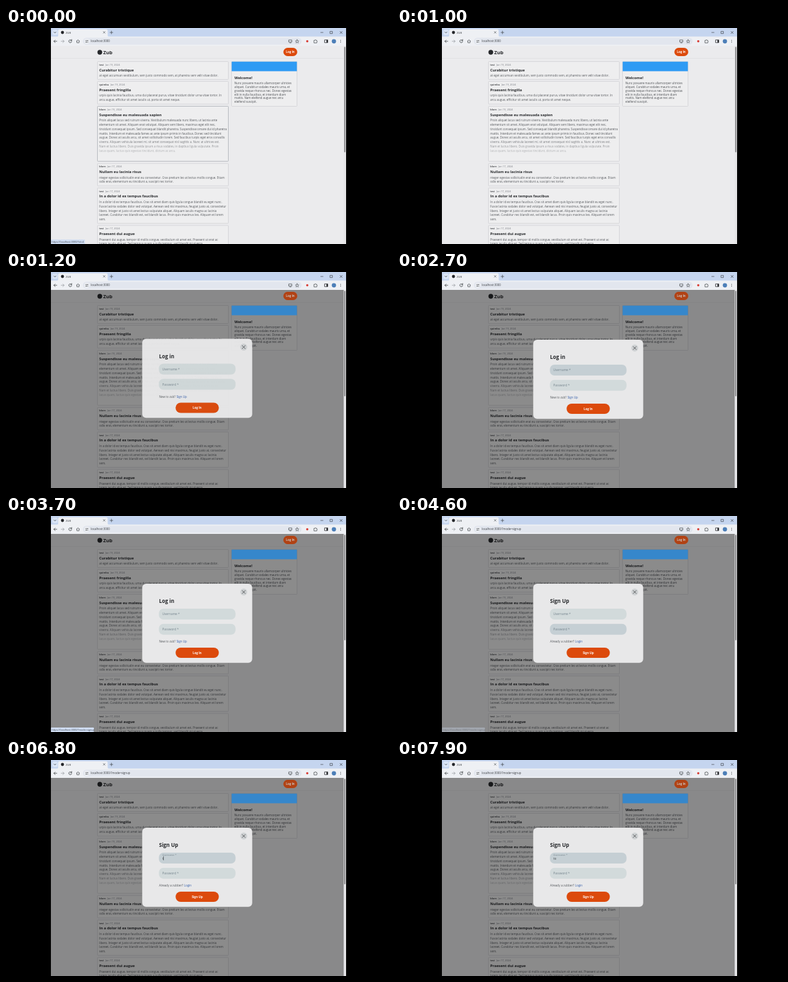
An HTML page for the animation above (8 s loop, 600 by 338 pixels).

```html
<!DOCTYPE html>
<html lang="en">
<head>
<meta charset="utf-8">
<title>Log in dialog</title>
<style>
html, body { margin: 0; width: 100%; height: 100%; overflow: hidden; background: #000; }
svg { display: block; width: 100vw; height: 100vh; font-family: "Open Sans", "Noto Sans", sans-serif; }
</style>
</head>
<body>
<svg id="stage" viewBox="0 0 600 338"></svg>
<script>
const stage = document.getElementById('stage');
const LOOP = 8000, STEP = 100;
const INK = '#26282b', ORANGE = '#dc4a0c', PAGE = '#ebebed', CARD = '#eeeeef', LINE = '#cdcdd1';
const BAR = '#eef0f4';

function add(parent, tag, attrs = {}, content) {
  const el = document.createElementNS('http://www.w3.org/2000/svg', tag);
  set(el, attrs);
  if (content !== undefined) el.textContent = content;
  parent.appendChild(el);
  return el;
}
function set(el, attrs) {
  for (const key in attrs) el.setAttribute(key, attrs[key]);
}
const group = (p, attrs) => add(p, 'g', attrs);
const rect = (p, x, y, width, height, fill, more) =>
  add(p, 'rect', { x, y, width, height, fill, ...more });
const dot = (p, cx, cy, r, fill, more) => add(p, 'circle', { cx, cy, r, fill, ...more });
const line = (p, d, stroke = '#3c4043', width = 0.8) =>
  add(p, 'path', { d, stroke, 'stroke-width': width, fill: 'none', 'stroke-linecap': 'round', 'stroke-linejoin': 'round' });
const label = (p, x, y, size, fill, str, more) =>
  add(p, 'text', { x, y, 'font-size': size, fill, ...more }, str);
const bold = { 'font-weight': 700 };
const centred = { 'font-weight': 700, 'text-anchor': 'middle' };

// Piecewise linear value from [time, value] pairs
function track(t, keys) {
  if (t <= keys[0][0]) return keys[0][1];
  for (let i = 1; i < keys.length; i++) {
    const [t0, v0] = keys[i - 1], [t1, v1] = keys[i];
    if (t <= t1) return v0 + (v1 - v0) * (t - t0) / (t1 - t0);
  }
  return keys[keys.length - 1][1];
}
const within = (t, a, b) => t >= a && t < b;
const show = (el, on) => el.setAttribute('opacity', +on);

const fade = add(add(stage, 'defs'), 'linearGradient', { id: 'fade', x1: 0, y1: 0, x2: 0, y2: 1 });
add(fade, 'stop', { offset: 0, 'stop-color': CARD, 'stop-opacity': 0 });
add(fade, 'stop', { offset: 1, 'stop-color': CARD });

rect(stage, 0, 0, 600, 338, '#000');

// Page
const page = group(stage);
rect(page, 70, 28, 460, 310, PAGE);
rect(page, 70, 47, 456, 0.6, '#dcdce0');
dot(page, 146.2, 38, 3.7, INK);
label(page, 151.5, 41, 7.6, INK, 'Zub', bold);

const posts = [
  [52.5, 28, 'tovi', '19', 'Curabitur tristique', [
    'at eget accumsan vestibulum, sem justo commodo sem, at pharetra sem velit vitae dolor.']],
  [83.5, 35.5, 'quimbu', '19', 'Praesent fringilla', [
    'urpis quis lacinia faucibus, urna dui placerat purus, vitae tincidunt dolor urna vitae tortor. In',
    'arcu augue, efficitur sit amet iaculis ut, porta sit amet neque.']],
  [122.5, 86, 'blorn', '19', 'Suspendisse eu malesuada sapien', [
    'Proin aliquet lacus sed rutrum viverra. Vestibulum malesuada nunc libero, ut lacinia ante',
    'elementum sit amet. Aliquam erat volutpat. Aliquam sem libero, maximus eget elit nec,',
    'tincidunt consequat ipsum. Sed consequat blandit pharetra. Suspendisse ornare dui id pharetra',
    'mattis. Interdum et malesuada fames ac ante ipsum primis in faucibus. Donec sed tincidunt',
    'augue. Donec at iaculis arcu, sit amet sollicitudin lorem. Sed faucibus turpis eget eros convallis',
    'viverra. Aliquam vehicula laoreet mi, sit amet consequat nisl sagittis a. Nunc at ultrices est.',
    'Nam et luctus libero. Duis gravida ipsum a risus sodales, in dapibus ligula vulputate. Proin',
    'lacus quam, luctus quis egestas tincidunt, dictum ac arcu.']],
  [212, 35, 'blorn', '17', 'Nullam eu lacinia risus', [
    'nteger egestas sollicitudin erat eu consectetur. Cras pretium leo at lectus mollis congue. Etiam',
    'odio erat, elementum eu tincidunt a, suscipit nec tortor.']],
  [250.3, 55.4, 'tovi', '17', 'In a dolor id ex tempus faucibus', [
    'In a dolor id ex tempus faucibus. Cras sit amet diam quis ligula congue blandit eu eget nunc.',
    'Fusce lacinia sodales dolor sed volutpat. Aenean sed nisi maximus, feugiat justo at, consectetur',
    'libero. Integer et justo sit amet lectus vulputate aliquet. Aliquam iaculis magna ac lacinia',
    'laoreet. Curabitur nec blandit est, vel blandit lacus. Proin quis maximus leo. Aliquam et lorem',
    'sem.']],
  [309, 60, 'tovi', '17', 'Praesent dui augue', [
    'Praesent dui augue, tempor id mollis congue, vestibulum sit amet est. Praesent ut erat ac',
    'lorem iaculis aliquet. Sed tempus quam a nulla tempor, sed blandit mi viverra.']]
];
const cards = posts.map(([y, h, user, day, title, rows]) => {
  const card = rect(page, 142.5, y, 204, h, CARD, { stroke: LINE, 'stroke-width': 0.7, rx: 0.8 });
  const name = label(page, 145.3, y + 6.3, 4, '#34363a', user, { 'font-weight': 600 });
  label(page, 145.3 + name.getComputedTextLength() + 2.4, y + 6.3, 4, '#777a80', `Jan ${day}, 2024`);
  label(page, 145.3, y + 15.1, 5.75, INK, title, bold);
  rows.forEach((row, i) => label(page, 145.3, y + 23.6 + i * 6.83, 4.48, '#55585c', row));
  return card;
});
rect(page, 143, 170, 203, 38, 'url(#fade)');

rect(page, 351.5, 52.5, 102, 70, CARD, { stroke: LINE, 'stroke-width': 0.7, rx: 0.8 });
label(page, 356, 79.8, 5.75, INK, 'Welcome!', bold);
['Nunc posuere mauris ullamcorper ultricies',
 'aliquet. Curabitur sodales mauris urna, et',
 'gravida neque rhoncus nec. Donec egestas',
 'elit in nulla faucibus, et interdum diam',
 'mattis. Nam eleifend augue nec arcu',
 'eleifend suscipit.'
].forEach((row, i) => label(page, 356, 88.1 + i * 5.83, 4.48, '#4c4f53', row));

const shade = rect(stage, 70, 28, 460, 310, '#000');

// The banner and the button keep more of their colour under the shade
const vivid = group(stage);
rect(vivid, 351.7, 52.7, 101.6, 14.9, '#2f9bf4');
rect(vivid, 432.3, 31, 21.6, 13, ORANGE, { rx: 6.5 });
label(vivid, 443.1, 39.1, 4.5, '#fff', 'Log In', centred);
const vividShade = group(stage);
rect(vividShade, 351.7, 52.7, 101.6, 14.9, '#4a5560');
rect(vividShade, 432.3, 31, 21.6, 13, '#40302a', { rx: 6.5 });

rect(stage, 526.3, 28, 3.7, 310, '#e6e6e8');
rect(stage, 526.9, 29.5, 2.2, 165, '#909092', { rx: 1 });

// Browser frame
const chrome = group(stage);
rect(chrome, 70, 0, 460, 14, '#c5d5ef');
add(chrome, 'path', { d: 'M79 14q2.3 0 2.3-2.3V4.5q0-2.5 2.5-2.5H156q2.5 0 2.5 2.5v7.2q0 2.3 2.3 2.3z', fill: BAR });
rect(chrome, 70, 13.4, 460, 14.6, BAR);
rect(chrome, 72, 2.5, 8.5, 8.5, '#d9e4f6', { rx: 2.5 });
line(chrome, 'M74.7 6.2l1.6 1.6l1.6-1.6');
dot(chrome, 88, 7, 2.4, INK);
label(chrome, 93.2, 8.5, 4, '#33363a', 'ZUB');
line(chrome, 'M151.6 5.4l2.8 2.8m0-2.8l-2.8 2.8', '#3c4043', 0.6);
line(chrome, 'M164.3 4.8v4.4m-2.2-2.2h4.4', '#3c4043', 0.7);
line(chrome, 'M490.5 7h3.6m11.2-1.7h3.4v3.4h-3.4zm15.3 0l3.4 3.4m0-3.4l-3.4 3.4', '#26282b', 0.6);
line(chrome, 'M79.2 20.8h-4.6m2-2l-2 2l2 2');
line(chrome, 'M86 20.8h4.6m-2-2l2 2l-2 2', '#9a9da2');
line(chrome, 'M102.2 19.6a2.3 2.3 0 1 0 .2 1.8m0-3.4v1.9h-1.9');
line(chrome, 'M109.9 20.6l2.3-2.1l2.3 2.1m-4 -.4v2.9h3.4v-2.9', '#3c4043', 0.7);
rect(chrome, 119.7, 15.2, 341, 11, '#e2e6ee', { rx: 5.5 });
dot(chrome, 126, 20.8, 4, BAR);
line(chrome, 'M124 19.6h2m1.8 0h.2M124 22h.2m1.8 0h2', '#3c4043', 0.6);
dot(chrome, 126.9, 19.6, 0.7, '#3c4043');
dot(chrome, 125.1, 22, 0.7, '#3c4043');
const url = label(chrome, 132.2, 22.3, 4.4, '#3a3d41', '');
line(chrome, 'M441 18.8h4.4v3.2h-4.4zm1.2 4.4h2', '#3c4043', 0.7);
line(chrome, 'M453.7 18.2l.8 1.8l1.9.2l-1.4 1.3l.4 1.9l-1.7-1l-1.7 1l.4-1.9l-1.4-1.3l1.9-.2z', '#3c4043', 0.6);
dot(chrome, 469.5, 20.8, 1.8, '#d9423a');
line(chrome, 'M480.3 19.3h1.2a.8.8 0 0 1 1.6 0h1.2v1.2a.8.8 0 0 1 0 1.6v1.2h-4z', '#3c4043', 0.7);
line(chrome, 'M496.8 18.7h4.6v4.2h-4.6z', '#26282b', 0.8);
rect(chrome, 499.4, 18.7, 2, 4.2, '#26282b');
dot(chrome, 511, 20.8, 3.4, '#4d7fb8');
[19, 20.8, 22.6].forEach(y => dot(chrome, 521.5, y, 0.5, '#3c4043'));

// Link address bubble in the lower left corner
function bubble(width, str) {
  const g = group(stage);
  rect(g, 70, 331, width, 7, '#cfdcf1', { rx: 1 });
  label(g, 71.3, 336, 3.85, '#3d4653', str);
  return g;
}
const postLink = bubble(53, 'https://localhost:3000/?id=4');
const modeLink = bubble(67, 'https://localhost:3000/?mode=signup');

// Dialog
const modal = group(stage);
rect(modal, 212.3, 106, 171.4, 123.7, '#e8e8e9', { rx: 6 });
dot(modal, 370.5, 119, 5.4, '#cfd2d4');
line(modal, 'M368.1 116.6l4.8 4.8m0-4.8l-4.8 4.8', '#303336', 0.75);
const heading = label(modal, 238.5, 136, 8, INK, '', bold);
const FIELD = '#d2dadb', HOVER = '#c5cfd4', HINT = '#75848d';
const user = rect(modal, 238.3, 145, 119.4, 17, FIELD, { rx: 7 });
const pass = rect(modal, 238.3, 168.8, 119.4, 17, FIELD, { rx: 7 });
const userHint = label(modal, 243.6, 155.3, 4.8, HINT, 'Username *');
label(modal, 243.6, 179.1, 4.8, HINT, 'Password *');
const typed = label(modal, 243.8, 155.7, 4.6, '#33383c', '');
const caret = rect(modal, 243.6, 150.6, 0.6, 6.4, '#33383c');
const prompt = label(modal, 238.5, 198.2, 4.55, '#55595d', '');
const link = label(modal, 267, 198.2, 4.55, '#2f5aa8', '');
rect(modal, 264.3, 206, 67.4, 16, ORANGE, { rx: 8 });
const action = label(modal, 298, 215.6, 4.6, '#fff', '', centred);

function draw(t) {
  set(cards[2], { stroke: t < 200 ? '#a2a6ae' : LINE });
  set(postLink, { opacity: track(t, [[300, 1], [500, 0]]) });
  set(modeLink, { opacity: track(t, [[3100, 0], [3300, 1], [4500, 1], [4600, 0.35], [4700, 0]]) });

  set(shade, { opacity: track(t, [[1000, 0], [1100, 0.34], [1200, 0.42]]) });
  set(vividShade, { opacity: track(t, [[1000, 0], [1100, 0.27]]) });
  const dy = track(t, [[1000, 3], [1100, 1.2], [1200, -1.5], [1300, -0.6], [1500, 0]]);
  set(modal, {
    opacity: track(t, [[1000, 0], [1100, 0.47], [1200, 0.97], [1300, 1]]),
    transform: `translate(0 ${dy})`
  });

  const signup = t >= 3800;
  url.textContent = 'localhost:3000' + (signup ? '/?mode=signup' : '');
  heading.textContent = signup ? 'Sign Up' : 'Log in';
  action.textContent = signup ? 'Sign Up' : 'Log In';
  prompt.textContent = signup ? 'Already a zubber?' : 'New to zub?';
  link.textContent = signup ? 'Login' : 'Sign Up';
  set(link, { x: 238.5 + prompt.getComputedTextLength() + 1.4 });

  set(user, { fill: within(t, 2000, 2900) || t >= 4700 ? HOVER : FIELD });
  set(pass, { fill: within(t, 2900, 3100) || within(t, 4500, 4700) ? HOVER : FIELD });

  const lift = track(t, [[5200, 0], [5500, 1]]);
  set(userHint, { y: 155.3 - 5.6 * lift, 'font-size': 4.8 - 0.9 * lift });
  typed.textContent = 'to'.slice(0, (t >= 6700) + (t >= 6900));
  const width = typed.textContent ? typed.getComputedTextLength() : 0;
  set(caret, { x: 243.6 + width });
  show(caret, within(t, 5300, 5800) || within(t, 6300, 7400));
}

const start = performance.now();
function tick() {
  const t = (performance.now() - start) % LOOP;
  draw(Math.floor(t / STEP) * STEP);
  requestAnimationFrame(tick);
}
tick();
</script>
</body>
</html>
```
